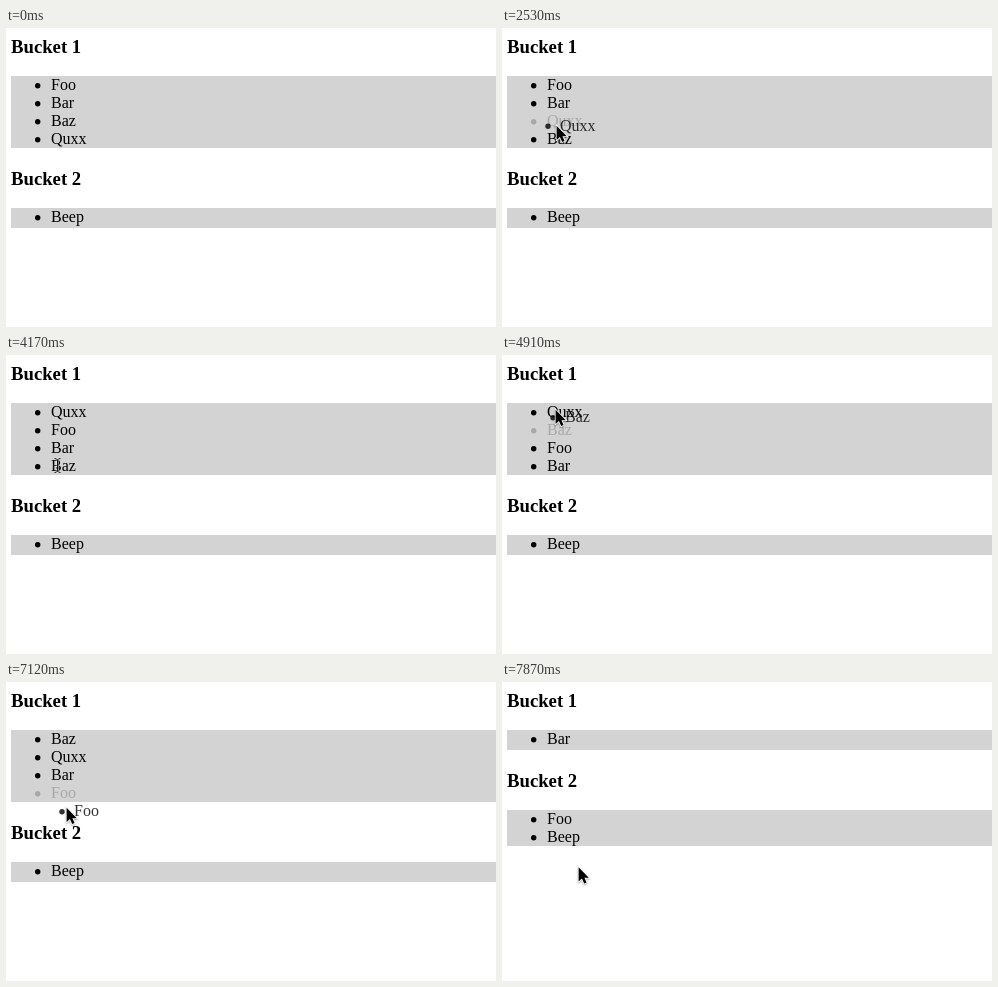
Animation, 490 px wide and 299 px high, one loop 8000 ms. Source, as an HTML page with a canvas:

```html
<!DOCTYPE html>
<html lang="en">
<head>
<meta charset="utf-8">
<title>Drag between buckets</title>
<style>
  html, body { margin: 0; width: 100%; height: 100%; overflow: hidden; background: #fff; }
  canvas { display: block; }
</style>
</head>
<body>
<canvas id="stage" width="490" height="299"></canvas>
<script>
const ctx = document.getElementById('stage').getContext('2d');
const LOOP = 8000, ROW = 18;

// Each step: start time, pointer kind, x, y and, when it changes, the list state.
// "|" separates the buckets, "*" marks the item being dragged.
const steps = [
  [0, '', 0, 0, 'Foo Bar Baz Quxx|Beep'],
  [150, 'arrow', 112, 4],
  [440, 'arrow', 72, 36],
  [590, 'beam', 57, 59],
  [1340, 'beam', 55.5, 89],
  [1490, 'beam', 56, 101],
  [1640, 'beam', 55.5, 108.5],
  [2090, 'beam', 55.5, 110.5],
  [2530, 'arrow', 54, 97, 'Foo Bar Quxx* Baz|Beep'],
  [2680, 'arrow', 54, 73, 'Foo Quxx* Bar Baz|Beep'],
  [2830, 'arrow', 54, 52, 'Quxx* Foo Bar Baz|Beep'],
  [2980, 'arrow', 54, 44],
  [3430, 'arrow', 54, 44, 'Quxx Foo Bar Baz|Beep'],
  [3730, 'beam', 54, 60],
  [3880, 'beam', 53, 80],
  [4020, 'beam', 52, 98],
  [4170, 'beam', 51.5, 110.5],
  [4320, 'beam', 51.5, 106],
  [4760, 'arrow', 52, 82, 'Quxx Foo Baz* Bar|Beep'],
  [4910, 'arrow', 53, 54, 'Quxx Baz* Foo Bar|Beep'],
  [5050, 'arrow', 54, 47, 'Baz* Quxx Foo Bar|Beep'],
  [5200, 'arrow', 55, 44],
  [5500, 'arrow', 49, 41, 'Baz Quxx Foo Bar|Beep'],
  [5800, 'beam', 52, 60],
  [5950, 'beam', 55, 77],
  [6090, 'beam', 54.5, 88],
  [6240, 'beam', 54, 90],
  [6390, 'beam', 53.5, 89.5],
  [6830, 'arrow', 55, 100, 'Baz Quxx Foo* Bar|Beep'],
  [6980, 'arrow', 60, 125, 'Baz Quxx Bar Foo*|Beep'],
  [7130, 'arrow', 67, 154],
  [7270, 'arrow', 74, 178, 'Baz Quxx Bar|Foo* Beep'],
  [7420, 'arrow', 76, 184.5],
  [7870, 'arrow', 76, 184.5, 'Bar|Foo Beep']
];

// Dragged text position relative to the pointer tip
const grab = { Quxx: [4, 5.5], Baz: [10, 13], Foo: [8, 9] };

const arrowShape = new Path2D('M.6.8V15L3.9 12 6.2 17 8.6 16 6.4 11.2H10.8Z');
const beamShape = new Path2D('M-3-7Q-.5-7 0-5.5Q.5-7 3-7M0-5.5V5.5M-3 7Q-.5 7 0 5.5Q.5 7 3 7M-1.5 2.5H1.5');

function drawItem(label, x, baseline, bulletGap, alpha) {
  ctx.globalAlpha = alpha;
  ctx.fillStyle = '#000';
  ctx.font = '16px "Liberation Serif", Times, serif';
  ctx.fillText(label, x, baseline);
  ctx.beginPath();
  ctx.arc(x - bulletGap, baseline - 4.3, 2.7, 0, 2 * Math.PI);
  ctx.fill();
  ctx.globalAlpha = 1;
}

function drawBucket(title, items, top) {
  const height = Math.max(20, items.length * ROW);
  ctx.fillStyle = '#000';
  ctx.font = 'bold 18.72px "Liberation Serif", Times, serif';
  ctx.fillText(title, 5, top - 23);
  ctx.fillStyle = '#d3d3d3';
  ctx.fillRect(5, top, 485, height);
  items.forEach((item, i) =>
    drawItem(item.replace('*', ''), 45, top + i * ROW + 14, 13.3, item.endsWith('*') ? 0.2 : 1));
  return top + height;
}

function drawPointer(kind, x, y) {
  if (!kind) return;
  ctx.save();
  ctx.translate(x, y);
  if (kind === 'arrow') {
    ctx.shadowColor = 'rgba(0,0,0,.35)';
    ctx.shadowBlur = 2;
    ctx.shadowOffsetY = 1;
    ctx.lineWidth = 1.6;
    ctx.strokeStyle = '#fff';
    ctx.stroke(arrowShape);
    ctx.shadowColor = 'transparent';
    ctx.fillStyle = '#000';
    ctx.fill(arrowShape);
  } else {
    ctx.lineWidth = 2.2;
    ctx.strokeStyle = 'rgba(255,255,255,.5)';
    ctx.stroke(beamShape);
    ctx.lineWidth = 1;
    ctx.strokeStyle = '#111';
    ctx.stroke(beamShape);
  }
  ctx.restore();
}

function draw(time) {
  const past = steps.filter(step => step[0] <= time);
  const [, kind, x, y] = past[past.length - 1];
  const lists = past.filter(step => step[4]).pop()[4].split('|').map(list => list.split(' '));

  ctx.fillStyle = '#fff';
  ctx.fillRect(0, 0, 490, 299);
  let top = 48;
  lists.forEach((items, i) => top = drawBucket('Bucket ' + (i + 1), items, top) + 60);

  const dragged = lists.flat().find(item => item.endsWith('*'));
  if (dragged) {
    const label = dragged.replace('*', '');
    const [dx, dy] = grab[label];
    drawItem(label, x + dx, y + dy, 12, 0.8);
  }
  drawPointer(kind, x, y);
}

const start = performance.now();
function tick() {
  draw((performance.now() - start) % LOOP);
  requestAnimationFrame(tick);
}
tick();
</script>
</body>
</html>
```
